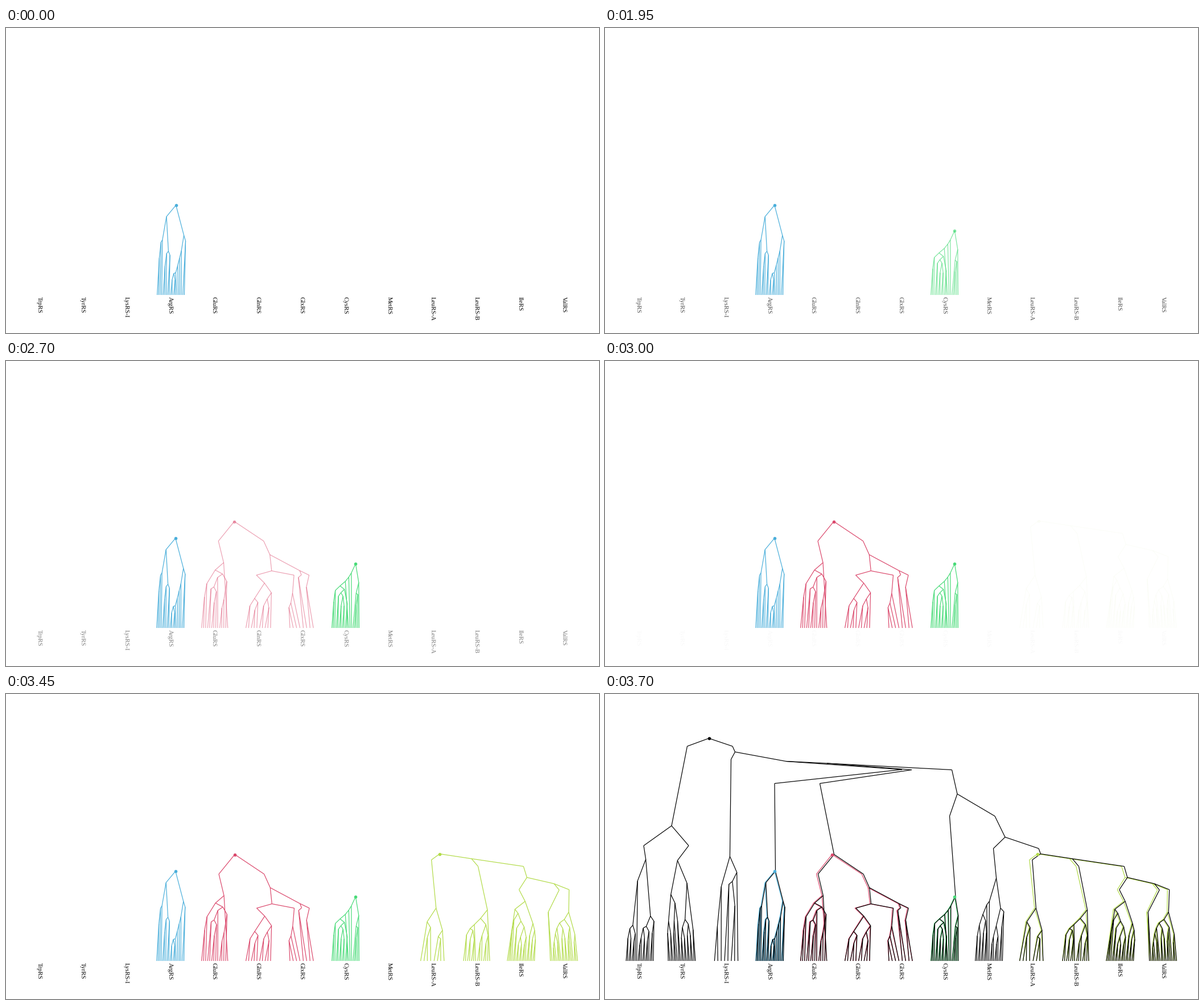
A matplotlib script that plays this animation: 1042x537 px, repeating every 4.1 s.

```python
import numpy as np
import matplotlib.pyplot as plt
from matplotlib.animation import FuncAnimation
from matplotlib.collections import LineCollection

W, H, DPI = 1042, 537, 100
LOOP, STEP = 4100, 50
PX = 72 / DPI
BASE = 470      # height of the leaves
SLOT = 53       # width shared by the leaves of one family
plt.rcParams["text.hinting"] = "none"


def comb(y, step, n, core):
    """A ladder of n splits, each giving off one leaf to the right."""
    for i in reversed(range(n)):
        core = (y + step * i, core, 1)
    return core


def split(spec):
    """Children of (y, left, right), or of (y, n): n leaves halved by rule."""
    y, *kids = spec
    if len(kids) > 1:
        return kids
    n, low = kids[0], y + .3 * (BASE - y)
    return [1 if m == 1 else (low, m) for m in ((n + 1) // 2, n // 2)]


def count(spec):
    return 1 if spec == 1 else sum(map(count, split(spec)))


def grow(spec, leaves, lean):
    """Place each split midway between its children along the leaning axis."""
    if spec == 1:
        return next(leaves), BASE
    y, kids = spec[0], [grow(kid, leaves, lean) for kid in split(spec)]
    foot = np.mean([kid[0] - lean * (BASE - kid[1]) for kid in kids])
    return (foot + lean * (BASE - y), y, *kids)


def family(center, lean, *specs):
    n = sum(map(count, specs))
    leaves = iter(center + SLOT * ((np.arange(n) + 1) / (n + 1) - .5))
    grown = [grow(spec, leaves, lean) for spec in specs]
    return grown if len(grown) > 1 else grown[0]


def branches(node, lean=0, shift=0):
    def place(x, y, *_):
        return x + shift + lean * (BASE - y), y

    out = []
    for kid in node[2:]:
        out.append((place(*node), place(*kid)))
        out += branches(kid, lean, shift)
    return out


trp = family(61, .045,
             (291, (329, (407, (413, 4), (422, 3)), 1),
              (391, (409, (412, 5), (418, 3)), (400, 3))))
tyr = family(135, -.05,
             (293, (353, (400, 4), (368, 5)),
              (333, (397, (411, 4), (405, 4)), (415, 2))))
lys = family(213, .035,
             (286, (339, (409, 2), 1), (314, (330, (335, 2), (373, 2)), 1)))
arg = family(288.7, .037,
             (312, (332, (373, (377, 3), 1), (393, (397, 3), (400, 2))),
              (365, comb(392, 13, 4, (432, 4)), (375, 2))))
glu = family(366.7, .065,
             (355, (368, (392, 3),
                    (375, (381, (398, (401, 2), (406, 3)), 1),
                     (388, (420, 3), 1))), 1))
gln = family(443.2, .125,
             (391, (418, (431, 2), (425, 3)),
              (408, (419, (431, 2), (434, 2)), 1)))
glx = family(519.5, -.125, comb(409, 17, 2, (434, 2)), (381, 2), (398, 2))
cys = family(596.5, .041,
             (357, comb(373, 7.5, 3,
                        (396, (404, 3),
                         (402, (408, (414, 2), (414, 4)), (427, 2)))),
              (390, (409, 1, (411, 3)), 1)))
met = family(674.5, .05,
             (324, comb(365, 6, 2, (388, (407, 4), (399, 4))),
              (377, (408, 6), (383, 3))))
leu_a = family(749.2, .07,
               (377, (401, 1, (411, 3)), (416, (427, 1, (431, 2)), 1)))
leu_b = family(827, .075,
               (380, (395, (406, (413, (424, 2), (416, 4)), 1), (406, 6)), 1))
ile = family(904.7, .08,
             (365, (379, 1, (386, (398, 3), (400, (412, 2), (410, 7)))),
              (404, (425, 2), (416, 4))))
val = family(980.5, -.06, (384, 2),
             (384, (397, (403, (412, (422, 5), 1), (413, 4)),
                    (411, (420, 3), 1)), (423, 3)))

# The families hang from a few fixed bends.
glux = (402, 282.5, (374, 317, glu),
        (453.5, 317,
         (464.3, 341,
          (467.3, 369.5, (440.5, 377, gln), (506.5, 377, glx[0])),
          (516.5, 369, (519.5, 376.5, glx[1]), (533, 377, glx[2])))))
leuval = (762, 281.5, (747.6, 292, leu_a),
          (818, 290, (829.5, 303.5, leu_b),
           (909.3, 303.5,
            (915.3, 323, (901.5, 344.5, ile),
             (963, 334, (972, 345, val[0]), (989.5, 344.5, val[1]))))))
east = (609.5, 133.5,
        (619, 176, (605.5, 215, (616, 357)),
         (685, 215,
          (703, 252, (682.5, 272, met), (762, 272, (765.5, 281.5))))))
trunk = (182.5, 78,
         (144.5, 92, (117, 232, (68, 267, trp), (147, 267, tyr))),
         (224, 92,
          (228.5, 102, (221.5, 115, lys),
           (318, 118.5,
            (522, 133, (298, 157.5, (299.5, 312))),
            (390, 122, (539, 133.5, (377.5, 157.5, (402.5, 282.5))), east)))))


class Clade:
    def __init__(self, tree, color):
        self.tree = tree
        self.lines = ax.add_collection(LineCollection(
            [], colors=[color], linewidths=1.2 * PX, zorder=1))
        self.dot, = ax.plot([], [], "o", color=color, ms=5.6 * PX, mew=0,
                            zorder=3)
        for part in (self.lines, self.dot):
            part.set_snap(False)

    def show(self, alpha, lean=0, shift=0):
        x, y = self.tree[:2]
        self.lines.set_segments(branches(self.tree, lean, shift))
        self.dot.set_data([x + shift + lean * (BASE - y)], [y])
        for part in (self.lines, self.dot):
            part.set_alpha(alpha)


fig = plt.figure(figsize=(W / DPI, H / DPI), dpi=DPI, facecolor="white")
ax = fig.add_axes([0, 0, 1, 1])
ax.set(xlim=(0, W), ylim=(H, 0))
ax.axis("off")

blue = Clade(arg, "#4bafdb")
green = Clade(cys, "#48db78")
red = Clade(glux, "#db486c")
lime = Clade(leuval, "#b2db48")
black = Clade(trunk, "black")

# Black copies of the coloured clades lean slightly further right.
copies = ax.add_collection(LineCollection(
    branches(arg, .005, .8) + branches(cys, .005, .5)
    + branches(glux, .003) + branches(leuval, .018),
    colors=["black"], linewidths=1.2 * PX, zorder=2, snap=False))

NAMES = ("TrpRS TyrRS LysRS-I ArgRS GluRS GlnRS GlxRS CysRS MetRS "
         "LeuRS-A LeuRS-B IleRS ValRS").split()
labels = [ax.text(55.7 + 76.83 * i, 473.2, name, rotation=-90, ha="left",
                  va="baseline", rotation_mode="anchor", fontsize=11 * PX,
                  family="Liberation Serif")
          for i, name in enumerate(NAMES)]


def fade(t, start, end, floor=.03):
    if t < start:
        return 0
    return min(1, floor + (1 - floor) * (t - start) / (end - start))


def update(i):
    t = i * STEP
    fades = [fade(t, 3600, 3700, .1), fade(t, 3000, 3450),
             fade(t, 2450, 2950),
             fade(1500 if 1500 <= t < 1600 else t, 1500, 2150)]
    in_black, in_lime, in_red, in_green = fades
    last = in_black > 0

    blue.show(1, shift=0 if in_green else .8)
    green.show(in_green)
    red.show(in_red, lean=-.016 if last else -.01 * (1 - in_red))
    lime.show(in_lime, lean=-.01 if last else 0)
    black.show(in_black)
    copies.set_alpha(in_black)

    # Labels fade in again with whichever clade came last.
    ink = next((a for a in fades if a), 1)
    for text in labels:
        text.set_alpha(ink)
    return []


anim = FuncAnimation(fig, update, frames=LOOP // STEP, interval=STEP,
                     repeat=True, repeat_delay=0, blit=False)
plt.show()
```
